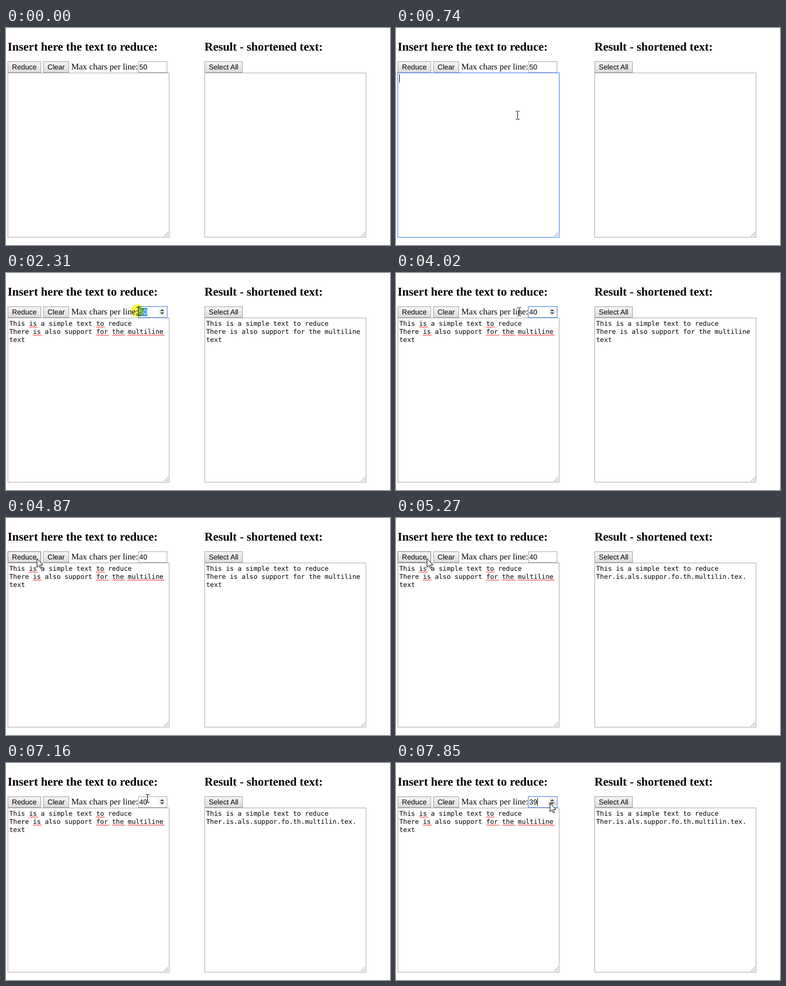
Animation of 712x403 px, one loop 8 s. Source, as an HTML page:

```html
<!DOCTYPE html>
<html lang="en">
<head>
<meta charset="utf-8">
<title>Text reducer</title>
<style>
  html, body { margin: 0; width: 100%; height: 100%; overflow: hidden; background: #fff; }
  svg { display: block; width: 712px; height: 403px; }
  text { white-space: pre; text-rendering: geometricPrecision; }
  .head { font: bold 22px "Liberation Serif", "Times New Roman", serif; }
  .label { font: 16px "Liberation Serif", "Times New Roman", serif; }
  .ui { font: 13.333px "Liberation Sans", Arial, sans-serif; }
  .mono { font: 12.18px "DejaVu Sans Mono", monospace; }
  .box { fill: #fff; stroke: #a9a9a9; }
  .btn rect { fill: url(#face); stroke: #a3a3a3; }
  .btn.hover rect { stroke: #747474; }
  .btn.down rect { fill: url(#faceDown); }
  .ring { fill: none; stroke: #6b97e2; }
  .ring .glow { stroke: #4d90fe; opacity: .35; }
  .grip { fill: none; stroke: #858585; }
  .wave { fill: none; stroke: #f00; }
  #press { fill: #fbf654; mix-blend-mode: multiply; }
</style>
</head>
<body>
<svg viewBox="0 0 712 403">
  <defs>
    <linearGradient id="face" x2="0" y2="1"><stop stop-color="#f5f5f5"/><stop offset="1" stop-color="#dcdcdc"/></linearGradient>
    <linearGradient id="faceDown" x2="0" y2="1"><stop stop-color="#dcdcdc"/><stop offset="1" stop-color="#f0f0f0"/></linearGradient>
  </defs>

  <text class="head" x="3" y="42">Insert here the text to reduce:</text>
  <text class="head" x="368" y="42">Result - shortened text:</text>
  <text class="label" x="121" y="77">Max chars per line:</text>

  <g class="btn" id="reduce"><rect x="3.5" y="62.5" width="61" height="20"/><text class="ui" x="11" y="77">Reduce</text></g>
  <g class="btn" id="clear"><rect x="69.5" y="62.5" width="47" height="20"/><text class="ui" x="77" y="77">Clear</text></g>
  <g class="btn"><rect x="368.5" y="62.5" width="70" height="20"/><text class="ui" x="376" y="77">Select All</text></g>

  <rect class="box" x="3.5" y="83.5" width="299" height="305"/>
  <rect class="box" x="368.5" y="83.5" width="299" height="305"/>
  <path class="grip" d="M293 387l8-8M297 387l4-4"/>
  <path class="grip" d="M658 387l8-8M662 387l4-4" style="stroke:#a08a62"/>

  <rect class="box" x="245.5" y="62.5" width="53" height="20"/>
  <rect id="sel" y="65" height="15" fill="#3297fd"/>
  <text class="ui" x="247" y="77"><tspan id="plain"></tspan><tspan id="picked" fill="#fff"></tspan></text>
  <g id="spin">
    <rect x="282" y="65" width="15" height="14" fill="#f5f5f5"/>
    <rect id="spinHover" x="282" y="72" width="15" height="7" fill="#d9d9d9"/>
    <path d="M285.5 71h8l-4-4zM285.5 73h8l-4 4z" fill="#505050"/>
  </g>

  <g class="ring" id="areaRing">
    <rect x="3.5" y="83.5" width="299" height="305"/><rect class="glow" x="2.5" y="82.5" width="301" height="307"/>
  </g>
  <g class="ring" id="fieldRing">
    <rect x="245.5" y="62.5" width="53" height="20"/><rect class="glow" x="244.5" y="61.5" width="55" height="22"/>
  </g>

  <g id="input"></g>
  <g id="output"></g>

  <rect id="caret" width="1" height="15"/>
  <circle id="press" cx="-1" cy="-1" r="12"/>
  <g id="cursor">
    <path id="arrow" d="M.5 .5V16.5L4.2 13L6.6 18.5L9 17.5L6.6 12.2H11.6Z" fill="#fff" stroke="#000"/>
    <path id="beam" d="M-3-7.5h3m1 0h3M.5-7v14M-3 7.5h3m1 0h3" fill="none" stroke="#000" shape-rendering="crispEdges"/>
  </g>
</svg>
<script>
const LOOP = 8000, TICK = 77, BLINK = 528;
const PASTE = 980, RESULT = 5190;
const CHAR = 22 / 3, DIGIT = 7.5;
const $ = id => document.getElementById(id);
const show = (id, on) => $(id).style.display = on ? '' : 'none';
const latest = (list, t) => list.filter(e => t >= e[0]).pop();

const lines = ['This is a simple text to reduce', 'There is also support for the multiline', 'text'];
const short = [lines[0], 'Ther.is.als.suppor.fo.th.multilin.tex.'];
const misspelt = ['is', 'to', 'for', 'the', 'multiline'];

// The pointer glides to x, y from start to end, then rests: [start, end, x, y]
const glides = [
  [130, 130, 357, 355], [380, 380, 57, 188], [380, 460, 242, 161], [530, 610, 225, 162],
  [1680, 2070, 264, 66], [2070, 2310, 245, 71], [2370, 2450, 228, 72],
  [4020, 4340, 240, 49], [4570, 4870, 57, 75],
  [6280, 6360, 82, 79], [6360, 7160, 262, 66], [7160, 7600, 285, 74]
];
// Each press moves the focus: [start, end, what]
const presses = [
  [660, 740, 'area'], [2070, 2450, 'field'], [4340, 4490, 'page'],
  [5100, 5270, 'reduce'], [7770, 7850, 'field']
];
const edits = [[0, '50'], [3170, '4'], [3490, '40'], [7770, '39']];

const row = (s, i, x) => `<text class="mono" x="${x}" y="${98 + 15 * i}">${s}</text>`;
const block = (list, x) => list.map((s, i) => row(s, i, x)).join('');

function waves(line, i) {
  return misspelt.map(word => {
    const at = ` ${line} `.indexOf(` ${word} `);
    if (at < 0) return '';
    const zigzag = 'l2-2l2 2'.repeat(Math.round(word.length * CHAR / 4));
    return `<path class="wave" d="M${Math.round(6 + at * CHAR)} ${101.5 + 15 * i}${zigzag}"/>`;
  }).join('');
}

$('input').innerHTML = block(lines, 6) + lines.map(waves).join('');
$('output').innerHTML = `<g id="full">${block(lines, 371)}</g><g id="cut">${block(short, 371)}</g>`;

function pointer(t) {
  if (t < 130 || (t >= 190 && t < 380)) return null;
  const i = glides.indexOf(latest(glides, t));
  const [t0, t1, x1, y1] = glides[i];
  if (t >= t1) return { x: x1, y: y1 };
  const [, , x0, y0] = glides[i - 1];
  const n = Math.max(1, Math.round((t1 - t0) / TICK));
  const f = Math.floor((t - t0) / (t1 - t0) * n) / n;
  return { x: Math.round(x0 + (x1 - x0) * f), y: Math.round(y0 + (y1 - y0) * f) };
}

function isBeam({ x, y }) {
  if (y < 62) return false;
  return y < 83 ? x >= 118 && x < 282 : x < 303;
}

function drawPointer(p, pressed) {
  show('cursor', p);
  show('press', p && pressed);
  if (!p) return;
  for (const id of ['cursor', 'press']) $(id).setAttribute('transform', `translate(${p.x} ${p.y})`);
  show('beam', isBeam(p));
  show('arrow', !isBeam(p));
}

function drawField(value, from) {
  $('plain').textContent = value.slice(0, from);
  $('picked').textContent = value.slice(from);
  $('sel').setAttribute('x', 247 + from * DIGIT);
  $('sel').setAttribute('width', (value.length - from) * DIGIT);
}

function draw(t) {
  const p = pointer(t);
  const over = (a, b) => p && p.x >= a && p.x < b && p.y >= 62 && p.y < 83;
  const [pressStart, pressEnd, focus] = latest(presses, t) || [0, 0, 'page'];
  const [editStart, value] = latest(edits, t);
  const inArea = focus === 'area', inField = focus === 'field';
  const pasted = t >= PASTE;

  drawPointer(p, t < pressEnd);
  $('reduce').classList.toggle('hover', !!over(3, 65));
  $('reduce').classList.toggle('down', focus === 'reduce' && t < RESULT);
  $('clear').classList.toggle('hover', !!over(69, 117));

  show('areaRing', inArea);
  show('fieldRing', inField);
  show('spin', inField || over(245, 299));
  show('spinHover', over(282, 298));
  show('input', pasted);
  show('full', pasted && t < RESULT);
  show('cut', t >= RESULT);

  // Dragging left over the first value selects its digits
  const dragging = inField && !editStart;
  const from = dragging ? Math.min(2, Math.max(0, Math.ceil((p.x - 251) / DIGIT))) : value.length;
  drawField(value, from);

  const active = Math.max(pressStart, inArea ? pasted && PASTE : editStart);
  const lit = Math.floor((t - active) / BLINK) % 2 === 0;
  show('caret', lit && (inArea || inField && from === value.length));
  $('caret').setAttribute('x', inField ? 247 + Math.round(value.length * DIGIT) : pasted ? 35 : 6);
  $('caret').setAttribute('y', inField ? 65 : pasted ? 116 : 86);
}

const begin = performance.now();
function tick() {
  draw((performance.now() - begin) % LOOP);
  requestAnimationFrame(tick);
}
tick();
</script>
</body>
</html>
```
